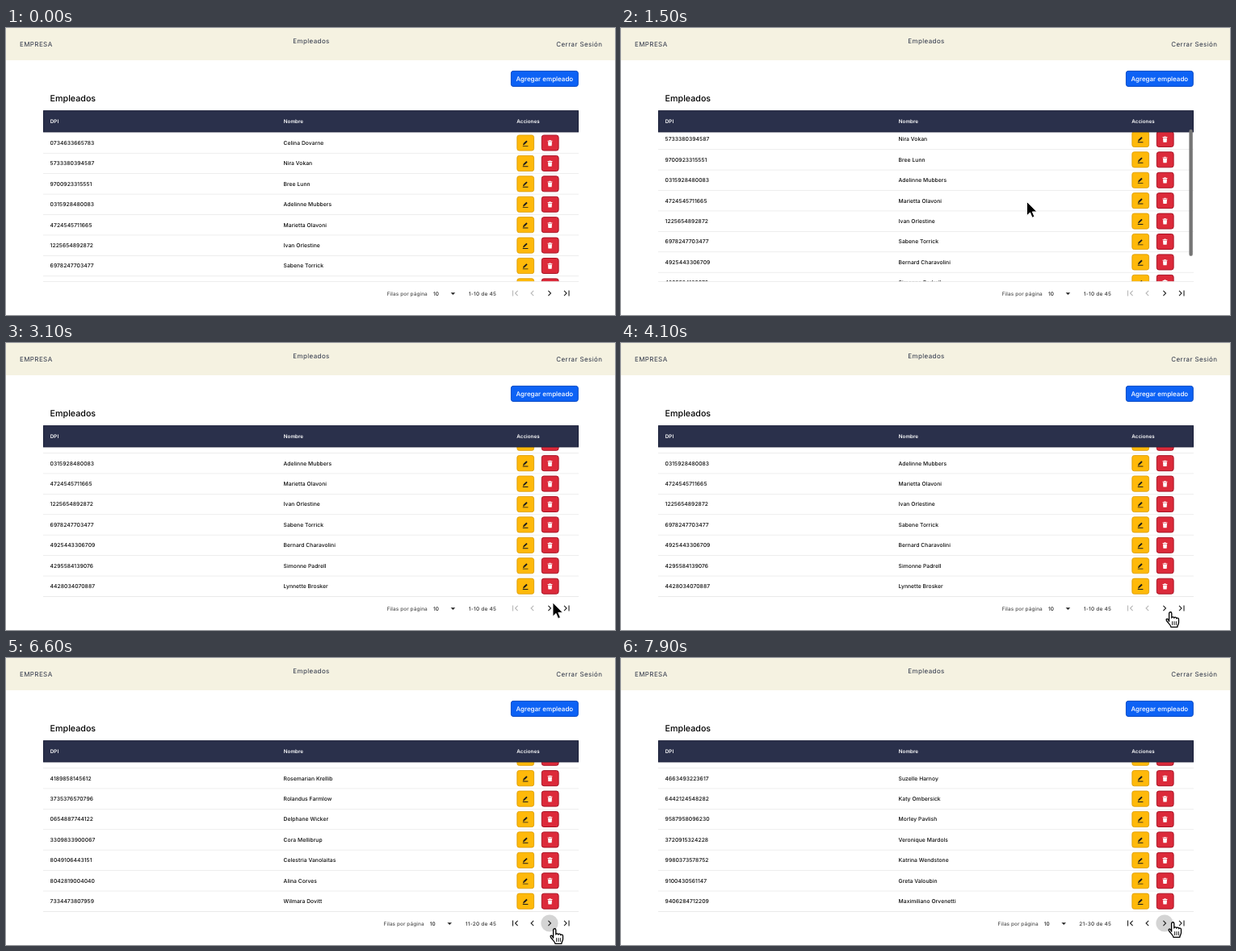
An HTML page that plays this animation: 754 by 356 pixels, repeating every 8 s.

```html
<!DOCTYPE html>
<html lang="es">
<head>
<meta charset="utf-8">
<title>Empleados</title>
<style>
  html, body { margin: 0; width: 100%; height: 100%; overflow: hidden; background: #fff; }
  svg { display: block; width: 754px; height: 356px; }
  text { font-family: Inter, Roboto, "Liberation Sans", sans-serif; fill: #0c0c0c; text-rendering: geometricPrecision; white-space: pre; }
  .nav { font-size: 8px; letter-spacing: .4px; fill: #2c3346; }
  .title { font-size: 10.7px; font-weight: 500; fill: #000; }
  .add { font-size: 8px; font-weight: 500; fill: #fff; }
  .head { font-size: 6.3px; font-weight: 600; fill: #fff; }
  .cell { font-size: 6.75px; font-weight: 500; letter-spacing: .04px; }
  .foot { font-size: 6.4px; font-weight: 500; letter-spacing: .1px; fill: #505050; }
  #range { letter-spacing: .28px; fill: #333; }
  .icon { fill: none; stroke: #222; stroke-width: 1.1; }
</style>
</head>
<body>
<svg viewBox="0 0 754 356">
  <defs>
    <clipPath id="view"><rect x="46" y="129" width="663" height="185.4"/></clipPath>
    <g id="actions">
      <rect x="632.8" y="-9.6" width="20.8" height="19.2" rx="2.6" fill="#ffb90a" stroke="#d99a00" stroke-width=".8"/>
      <path d="M641.3 1.3L645 -2.2" stroke="#1c1c1c" stroke-width="1.9"/>
      <path d="M640 2.8l.6-2.2 1.6 1.6zM639.8 3.4h6.6v.9h-6.6z" fill="#1c1c1c"/>
      <rect x="663.3" y="-9.5" width="20.8" height="19" rx="2.6" fill="#dc2a3a" stroke="#a81426"/>
      <path d="M670.6 -2.8h1.9v-.7h2v.7h1.9v1h-5.8zM671 -1.3h5l-.4 5.1h-4.2z" fill="#fff"/>
    </g>
  </defs>

  <rect width="754" height="40" fill="#f5f2e1"/>
  <text class="nav" x="17" y="23.2">EMPRESA</text>
  <text class="nav" x="355.3" y="19">Empleados</text>
  <text class="nav" x="681.3" y="23.2">Cerrar Sesión</text>
  <rect x="625.4" y="53.4" width="82.9" height="19" rx="2.6" fill="#0d62f5" stroke="#0848c4"/>
  <text class="add" x="631.4" y="65.8">Agregar empleado</text>
  <text class="title" x="54.6" y="91.4">Empleados</text>

  <g clip-path="url(#view)"><g id="rows"></g></g>
  <rect x="46.5" y="102.7" width="662" height="26.2" fill="#2a304b" stroke="#171c36"/>
  <text class="head" x="54.8" y="118.3">DPI</text>
  <text class="head" x="343.8" y="118.3">Nombre</text>
  <text class="head" x="632.3" y="118.3">Acciones</text>
  <rect x="46" y="314" width="663" height=".7" fill="#e6e6e6"/>
  <rect id="thumb" x="703.4" width="4.4" height="157" rx="2.2" fill="#757575"/>

  <g id="sizes">
    <text class="foot" x="471.8" y="331.5">Filas por página</text>
    <text class="foot" x="529" y="331.9" style="fill:#222">10</text>
    <path d="M550.6 328.2h5.6l-2.8 2.9z" fill="#222"/>
  </g>
  <text id="range" class="foot" x="607.2" y="331.5" text-anchor="end"></text>
  <circle id="ripple" cx="673" cy="329" fill="#d4d4d4"/>
  <g id="back" class="icon">
    <path d="M627.5 325.6v6.8M633.6 325.9l-3.1 3.1 3.1 3.1"/>
    <path d="M653.2 325.9l-3.1 3.1 3.1 3.1"/>
  </g>
  <g class="icon">
    <path d="M671.4 325.9l3.1 3.1-3.1 3.1"/>
    <path d="M691 325.9l3.1 3.1-3.1 3.1M697 325.6v6.8"/>
  </g>

  <path id="arrow" d="M0 0v17.2l4-3.7 2.6 6.2 2.8-1.2-2.6-6.1h5.5z" fill="#000" stroke="#fff" stroke-width=".9"/>
  <g id="hand" stroke="#000" stroke-linejoin="round" stroke-linecap="round">
    <path d="M4.6 12.2V2.4c0-2.2 3.2-2.2 3.2 0V8c.2-1.7 3-1.6 3 .2c.3-1.5 2.9-1.3 2.9.6c.4-1.2 2.8-.9 2.8 1v4c0 2-1.6 3.2-1.7 5.6H7C6.6 16.8 3 14 1.3 11.2C.4 9.4 2.3 8.6 3.4 9.9z" fill="#fff" stroke-width="1.3"/>
    <path d="M8.6 12.6v4M11 12.6v4M13.4 12.6v4" stroke-width=".9"/>
  </g>
</svg>
<script>
const LOOP = 8000, STEP = 100, PITCH = 25.42, FIRST = 142.5, BOTTOM = 69.6;

// Later pages are only seen scrolled down, so they start at row 3.
const pages = [
  { from: 0, shift: 0, range: '1-10 de 45', rows: [
    '0734633665783|Celina Dovarne', '5733380394587|Nira Vokan', '9700923315551|Bree Lunn',
    '0315928480083|Adelinne Mubbers', '4724545711665|Marietta Olavoni', '1225654892872|Ivan Orlestine',
    '6978247703477|Sabene Torrick', '4925443306709|Bernard Charavolini', '4295584139076|Simonne Padrell',
    '4428034070887|Lynnette Brosker'] },
  { from: 3, shift: -4.2, range: '11-20 de 45', rows: [
    '4189858145612|Rosemarian Krellib', '3735376570796|Rolandus Farmlow', '0654887744122|Delphane Wicker',
    '3309833900067|Cora Mellibrup', '8049106443151|Celestria Vanolaitas', '8042819004040|Alina Corves',
    '7334473807959|Wilmara Dovitt'] },
  { from: 3, shift: -5.2, range: '21-30 de 45', rows: [
    '4663493223617|Suzelle Harnoy', '6442124548282|Katy Ombersick', '9587958096230|Morley Pavlish',
    '3720915324228|Veronique Mardols', '9980373578752|Katrina Wendstone', '9100430561147|Greta Valoubin',
    '9406284712209|Maximiliano Orvenetti'] }
];
const clicks = [5500, 7300];

// Tracks: [time, value, ...]
const scrollTrack = [[1200, 0], [1300, 6], [1400, 17], [1500, 30], [1600, 44], [1700, 56], [1800, 64], [1900, 68], [2000, BOTTOM]];
const barTrack = [[1200, 0], [1300, 1], [2500, 1], [2800, 0]];
const arrowTrack = [[500, 487, 358], [800, 492, 275], [1100, 502.5, 215.5], [2400, 502.5, 215.5], [2700, 590, 272], [3000, 672, 320], [3100, 677, 322]];
const handTrack = [[3300, 673, 330], [3700, 674, 333], [5100, 674, 333], [5500, 673, 335], [6800, 673, 335], [7300, 676, 330], [7900, 677, 327]];
const HAND_AT = 3300;

const $ = id => document.getElementById(id);
const svgNS = 'http://www.w3.org/2000/svg';

function add(parent, tag, attrs, text = '') {
  const el = document.createElementNS(svgNS, tag);
  for (const key in attrs) el.setAttribute(key, attrs[key]);
  el.textContent = text;
  return parent.appendChild(el);
}

function sample(track, t) {
  if (t <= track[0][0]) return track[0].slice(1);
  for (let i = 1; i < track.length; i++) {
    const a = track[i - 1], b = track[i];
    if (t < b[0]) {
      const k = (t - a[0]) / (b[0] - a[0]);
      return a.slice(1).map((v, j) => v + (b[j + 1] - v) * k);
    }
  }
  return track[track.length - 1].slice(1);
}

for (let i = 0; i < 10; i++) {
  const g = add($('rows'), 'g', { transform: `translate(0 ${FIRST + i * PITCH})` });
  add(g, 'rect', { x: 46, y: 12.4, width: 663, height: .7, fill: '#e6e6e6' });
  add(g, 'use', { href: '#actions' });
}
const pageGroups = pages.map(page => {
  const g = add($('rows'), 'g', {});
  page.rows.forEach((row, i) => {
    const [id, name] = row.split('|');
    const y = FIRST + (page.from + i) * PITCH + 2.4;
    add(g, 'text', { class: 'cell', x: 54.6, y }, id);
    add(g, 'text', { class: 'cell', x: 343.6, y }, name);
  });
  return g;
});

function show(el, on) { el.style.display = on ? '' : 'none'; }
function place(el, [x, y]) { el.setAttribute('transform', `translate(${x} ${y})`); }

function render(t) {
  const [scroll] = sample(scrollTrack, t);
  const index = clicks.filter(c => t >= c).length;
  const page = pages[index];

  place($('rows'), [0, -scroll]);
  pageGroups.forEach((g, i) => show(g, i === index));
  $('thumb').setAttribute('y', 103.2 + scroll * .755);
  $('thumb').setAttribute('opacity', sample(barTrack, t)[0]);

  place($('sizes'), [page.shift, 0]);
  $('range').textContent = page.range;
  $('back').style.stroke = index ? '#222' : '#b8b8b8';
  $('ripple').setAttribute('r', 10.6 * Math.min(1, Math.max(0, (t - clicks[0] + 100) / 300)));

  const hand = t >= HAND_AT;
  show($('hand'), hand);
  show($('arrow'), !hand && t >= 600);
  place($('hand'), sample(handTrack, t));
  place($('arrow'), sample(arrowTrack, t));
}

const start = performance.now();
function tick() {
  const t = (performance.now() - start) % LOOP;
  render(Math.floor(t / STEP) * STEP);
  requestAnimationFrame(tick);
}
tick();
</script>
</body>
</html>
```
